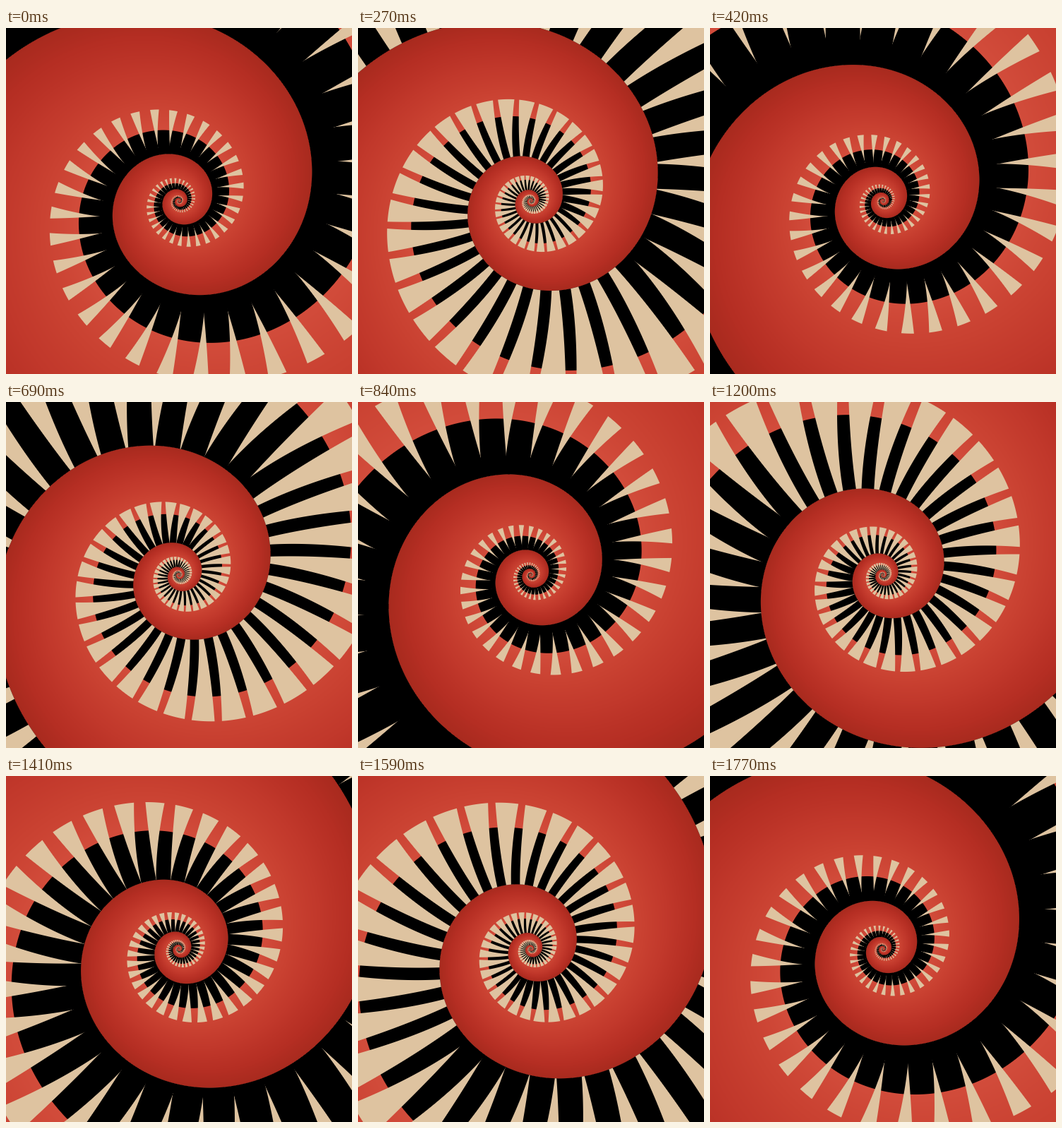
These frames come from a looping animation (490x490 px, 1800 ms). An HTML page with a canvas:

```html
<!DOCTYPE html>
<html lang="en">
<head>
<meta charset="utf-8">
<title>Spiral teeth</title>
<style>
  html, body { margin: 0; width: 100%; height: 100%; overflow: hidden; background: #000; }
  canvas { display: block; width: 490px; height: 490px; }
</style>
</head>
<body>
<canvas id="stage" width="490" height="490"></canvas>
<script>
const SIZE = 490, LOOP = 1800, STEP = 30, PULSES = 4;
const TEETH = 30, PITCH = 12;          // teeth per turn, degrees per tooth
const LN4 = Math.log(4);               // the spiral grows fourfold per turn
const TURN = 2 * Math.PI;
const SLOPE = LN4 / TURN;
const STRETCH = Math.hypot(1, SLOPE);
const BAND_START = 0.7612, TOOTH_START = 1.1, SEAM_START = 29;
const CREAM = [222, 195, 160];
const RED_STOPS = [
  [0, 210, 76, 59], [0.35, 201, 65, 49], [0.6, 193, 56, 43],
  [0.85, 181, 46, 35], [1, 168, 42, 30]
];
// rise of the teeth within one pulse: [phase, openness]
const RISE = [[0, 0], [0.133, 0.55], [0.2, 0.63], [0.533, 0.98], [0.6, 1]];
const FALL_END = 0.95;

const ctx = document.getElementById("stage").getContext("2d");
const image = ctx.createImageData(SIZE, SIZE);
const out = image.data;

const frac = v => v - Math.floor(v);
const mix = (a, b, q) => a + (b - a) * q;
const cover = d => d <= -0.5 ? 0 : d >= 0.5 ? 1 : d + 0.5;

function along(points, v, col = 1) {
  let i = 1;
  while (i < points.length - 1 && v > points[i][0]) i++;
  const a = points[i - 1], b = points[i];
  const q = Math.min(1, Math.max(0, (v - a[0]) / (b[0] - a[0])));
  return mix(a[col], b[col], q);
}

function openness(p) {
  if (p <= 0.6) return along(RISE, p);
  if (p >= FALL_END) return 0;
  return (1 + Math.cos(Math.PI * (p - 0.6) / (FALL_END - 0.6))) / 2;
}

// red shading across the band
const SHADES = 256;
const shades = Array.from({ length: SHADES + 1 }, (_, i) =>
  [1, 2, 3].map(c => along(RED_STOPS, i / SHADES, c)));

// log-spiral coordinates of every pixel: across the band, and along the teeth
const COUNT = SIZE * SIZE;
const across = new Float32Array(COUNT);
const offset = new Float32Array(COUNT);
const index = new Uint8Array(COUNT);
const radius = new Float32Array(COUNT);
for (let i = 0; i < COUNT; i++) {
  const dx = i % SIZE + 0.5 - SIZE / 2;
  const dy = Math.floor(i / SIZE) + 0.5 - SIZE / 2;
  const r = Math.max(0.5, Math.hypot(dx, dy));
  const angle = Math.atan2(dy, dx);
  const tooth = ((angle - SLOPE * Math.log(r)) * 360 / TURN - TOOTH_START) / PITCH;
  const k = Math.round(tooth);
  radius[i] = r;
  across[i] = frac(Math.log(r) / LN4 + angle / TURN - BAND_START);
  offset[i] = Math.abs(tooth - k);
  index[i] = ((k % TEETH) + TEETH) % TEETH;
}

function draw(time) {
  const u = time / LOOP;
  const e = openness(frac(u * PULSES));
  const shift = u - 0.116 * e;
  const black = mix(0.2965, 0.459, e);
  const end = mix(0.48, 0.591, e);
  const endWidth = mix(0.46, 0.77, e);
  // tooth width where it meets the red edge; negative means it ends before
  const feet = Array.from({ length: TEETH }, (_, k) => {
    const ramp = frac((k * PITCH + TOOTH_START - SEAM_START) / 360 + u);
    return mix(-0.18, 0.4 - 0.55 * ramp ** 3, e * e);
  });
  const bandScale = LN4 / STRETCH;
  const toothScale = TURN / TEETH / STRETCH;

  for (let i = 0; i < COUNT; i++) {
    const px = radius[i] * bandScale;
    let y = frac(across[i] + shift);
    if (y > 0.9) y -= 1;
    const g = y < 0 ? (y + 1 - black) / (1 - black) : Math.max(0, (y - black) / (1 - black));
    const red = shades[Math.round(g * SHADES)];
    const inner = cover(y * px);
    const light = 1 - inner * cover((black - y) * px);
    let tooth = 0;
    if (inner && y < end + 0.2) {
      const half = mix(feet[index[i]], endWidth, y / end) / 2;
      tooth = inner * cover((end - y) * px) *
        cover((half - offset[i]) * radius[i] * toothScale);
    }
    for (let c = 0; c < 3; c++) {
      out[i * 4 + c] = mix(red[c] * light, CREAM[c], tooth);
    }
    out[i * 4 + 3] = 255;
  }
  ctx.putImageData(image, 0, 0);
}

const start = performance.now();
let shown = -1;
function tick() {
  const t = (performance.now() - start) % LOOP;
  const now = Math.floor(t / STEP) * STEP;
  if (now !== shown) draw(shown = now);
  requestAnimationFrame(tick);
}
tick();
</script>
</body>
</html>
```
